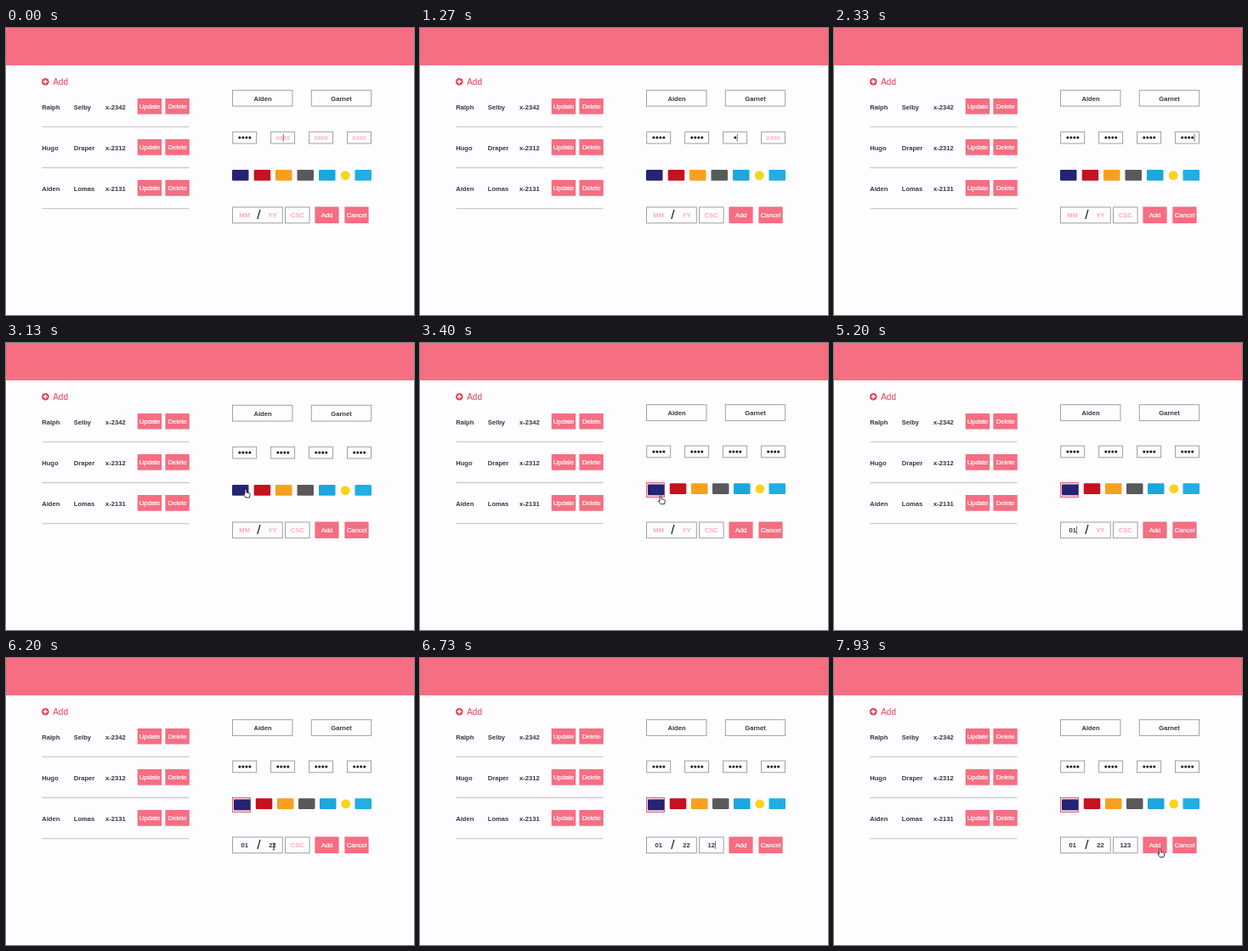
An HTML page with a canvas that plays this animation: 480x338 px, repeating every 8000 ms.

```html
<!DOCTYPE html>
<html lang="en">
<head>
<meta charset="utf-8">
<title>Card form</title>
<style>
html, body { margin: 0; width: 100%; height: 100%; overflow: hidden; background: #fdfcfe; }
canvas { display: block; width: 480px; height: 338px; }
</style>
</head>
<body>
<canvas id="stage"></canvas>
<script>
const W = 480, H = 338, LOOP = 8000;
const PINK = '#f56e82', INK = '#34383f', PALE = '#fbabb7';
const FONT = '"Liberation Sans", Arial, Helvetica, sans-serif';

const canvas = document.getElementById('stage');
const ctx = canvas.getContext('2d');
const ratio = window.devicePixelRatio || 1;
canvas.width = W * ratio;
canvas.height = H * ratio;

const people = [
  ['Ralph', 'Selby', 'x-2342'],
  ['Hugo', 'Draper', 'x-2312'],
  ['Aiden', 'Lomas', 'x-2131']
];

const cards = ['#252373', '#c5121f', '#f8a01e', '#59595c', '#1ba6de', '#fdd21c', '#20aee5'];
const cardX = [266, 291.7, 317, 342.5, 368, 394, 410.5];
const shiftedX = [268, 293.8, 319, 344, 369, 394.6, 410.5];
const PICK_TIME = 3200;

// Inputs that get filled in: centre, hint, final value, time of each key
const numbers = [
  { x: 280.7, hint: '####', keys: [-1, -1, -1, -1] },
  { x: 325.6, hint: '####', keys: [70, 200, 270, 400] },
  { x: 370.6, hint: '####', keys: [1270, 1330, 1470, 1530] },
  { x: 415.5, hint: '####', keys: [2000, 2130, 2200, 2330] }
];
const month = { x: 280.7, hint: 'MM', value: '01', keys: [5070, 5200] };
const year = { x: 313.5, hint: 'YY', value: '22', keys: [5870, 6000] };
const code = { x: 342.8, hint: 'CSC', value: '123', keys: [6670, 6730, 6930] };

const carets = [
  [0, 870, numbers[1]], [1000, 1800, numbers[2]], [1800, 2530, numbers[3]],
  [4330, 4730, month], [5070, 5470, month], [5530, 6200, year], [6530, 7400, code]
];

// Pointer trips: start, arrival, hidden at, from x, y, to x, y
const trips = [
  [2530, 3100, 3340, 281, 129, 282, 172.5],
  [3340, 3600, 3930, 282, 172.5, 290, 228],
  [3930, 4130, 5070, 290, 228, 282, 214.5],
  [6200, 6530, 6670, 315, 222, 343, 222],
  [6990, 7600, LOOP, 343, 222, 383.5, 225]
];

const handShape = new Path2D('M-1 .3Q0-.8 1 .3V3.5L4.2 4.2Q5.4 4.6 5.2 6L4.4 9.5H0L-2.8 6Q-2.6 4.7-1 6Z');
const arrowShape = new Path2D('M0 0V9L2.1 7.1 3.5 10.2 5 9.5 3.6 6.5H6.5Z');
const beamShape = new Path2D('M-1.3-4Q0-4 0-3V3Q0 4-1.3 4M1.3-4Q0-4 0-3M0 3Q0 4 1.3 4');

function text(str, x, y, color, size = 7.6, weight = 'bold', align = 'center') {
  ctx.font = `${weight} ${size}px ${FONT}`;
  ctx.textAlign = align;
  ctx.fillStyle = color;
  ctx.fillText(str, x, y);
}

function fill(x, y, w, h, color, radius = 0) {
  ctx.fillStyle = color;
  ctx.beginPath();
  ctx.roundRect(x, y, w, h, radius);
  ctx.fill();
}

function disc(x, y, r, color) {
  ctx.fillStyle = color;
  ctx.beginPath();
  ctx.arc(x, y, r, 0, Math.PI * 2);
  ctx.fill();
}

function outline(x, y, w, h, color = '#a0a0a4') {
  ctx.strokeStyle = color;
  ctx.lineWidth = 1;
  ctx.strokeRect(x + 0.5, y + 0.5, w - 1, h - 1);
}

function button(label, x, y, w, h) {
  fill(x, y, w, h, PINK, 0.5);
  ctx.letterSpacing = '-0.2px';
  text(label, x + w / 2, y + h / 2 + 2.9, '#fff', 8, 'normal');
  ctx.strokeStyle = '#fff';
  ctx.lineWidth = 0.2;
  ctx.strokeText(label, x + w / 2, y + h / 2 + 2.9);
  ctx.letterSpacing = '0px';
}

function drawList() {
  fill(0, 0, W, 44, PINK);
  disc(46.3, 63.2, 4.3, '#e2405a');
  fill(43.8, 62.4, 5, 1.6, '#fff');
  fill(45.5, 60.7, 1.6, 5, '#fff');
  text('Add', 55.2, 66.8, '#e2405a', 10, 'normal', 'left');

  people.forEach((row, i) => {
    const y = 82.9 + 48.1 * i;
    row.forEach((str, k) => text(str, [42.2, 79.8, 117][k], y + 12.8, INK, 7.6, 'bold', 'left'));
    button('Update', 154.7, y, 28.5, 18.7);
    button('Delete', 187.4, y, 28.4, 18.7);
    fill(42.5, y + 32.8, 173, 1.4, '#cbcacd');
  });
}

function drawCards(picked) {
  const xs = picked ? shiftedX : cardX;
  const y = picked ? 165.2 : 167;
  if (picked) {
    fill(266, 164, 22, 18, '#fbd3da');
    outline(266, 164, 22, 18, '#e4637a');
  }
  cards.forEach((color, i) => {
    if (i === 5) disc(xs[i] + 5.2, y + 6.6, 5.4, color);
    else fill(xs[i], i || !picked ? y : 166.5, 19.5, 12.8, color, 1.2);
  });
}

const typed = (field, t) => field.keys.filter(k => t >= k).length;

function drawNumber(field, y, t) {
  const n = typed(field, t);
  outline(field.x - 14.5, y, 29, 14.7);
  if (!n) text(field.hint, field.x, y + 10.2, PALE, 7.4);
  for (let i = 0; i < n; i++) disc(field.x - 2 * n + 4 * i + 2.2, y + 7.3, 1.5, '#15151a');
}

function drawInput(field, t) {
  const n = typed(field, t);
  text(n ? field.value.slice(0, n) : field.hint, field.x, 223.2, n ? INK : PALE);
}

function drawCaret(t, numberY) {
  const hit = carets.find(([from, to]) => t >= from && t < to);
  if (!hit) return;
  const field = hit[2], n = typed(field, t);
  ctx.font = `bold 7.6px ${FONT}`;
  const width = field.value ? ctx.measureText(field.value.slice(0, n)).width : 4 * n;
  const y = field.value ? 216 : numberY + 3;
  fill(field.x + width / 2 + 0.2, y, 0.8, 9, '#50535f');
}

function pointerKind(x, y) {
  const inside = (l, r, top, bottom) => x > l && x < r && y > top && y < bottom;
  if (inside(266, 430, 164, 182) || inside(363, 391, 211, 230)) return 'hand';
  if (inside(266, 295, 121, 136) || inside(269, 292, 211, 226) ||
      inside(304, 325, 211, 230) || inside(328, 357, 211, 230)) return 'beam';
  return 'arrow';
}

function drawPointer(t) {
  const trip = trips.find(([from, , gone]) => t >= from && t < gone);
  if (!trip) return;
  const [from, to, , x0, y0, x1, y1] = trip;
  const p = Math.min(1, (t - from) / (to - from));
  const e = p * p * (3 - 2 * p);
  const x = x0 + (x1 - x0) * e, y = y0 + (y1 - y0) * e;
  const kind = pointerKind(x, y);

  ctx.save();
  ctx.translate(x, y);
  ctx.lineJoin = 'round';
  if (kind === 'beam') {
    ctx.strokeStyle = '#222';
    ctx.lineWidth = 0.9;
    ctx.stroke(beamShape);
  } else {
    const hand = kind === 'hand';
    const shape = hand ? handShape : arrowShape;
    ctx.fillStyle = hand ? '#fff' : '#111';
    ctx.strokeStyle = hand ? '#222' : '#fff';
    ctx.lineWidth = 0.9;
    ctx.fill(shape);
    ctx.stroke(shape);
  }
  ctx.restore();
}

function drawForm(t) {
  const picked = t >= PICK_TIME;
  const nameY = picked ? 72.2 : 72.8;
  const numberY = picked ? 120.6 : 121.8;

  outline(266, nameY, 71.5, 19.7);
  outline(358.8, nameY, 71.4, 19.7);
  text('Aiden', 302, nameY + 12.7, INK);
  text('Garnet', 394.5, nameY + 12.7, INK);
  numbers.forEach(field => drawNumber(field, numberY, t));
  drawCards(picked);

  outline(266, 210.5, 59.8, 19.7);
  outline(328, 210.5, 29.6, 19.7);
  drawInput(month, t);
  drawInput(year, t);
  drawInput(code, t);
  text('/', 297.3, 224.7, '#111', 15.5, 'normal');
  button('Add', 363.4, 210.5, 28.2, 19.6);
  button('Cancel', 398.4, 210.5, 28.2, 19.6);
  drawCaret(t, numberY);
}

function draw(t) {
  ctx.setTransform(ratio, 0, 0, ratio, 0, 0);
  fill(0, 0, W, H, '#fdfcfe');
  drawList();
  drawForm(t);
  drawPointer(t);
}

const start = performance.now();
function tick() {
  draw((performance.now() - start) % LOOP);
  requestAnimationFrame(tick);
}
tick();
</script>
</body>
</html>
```
